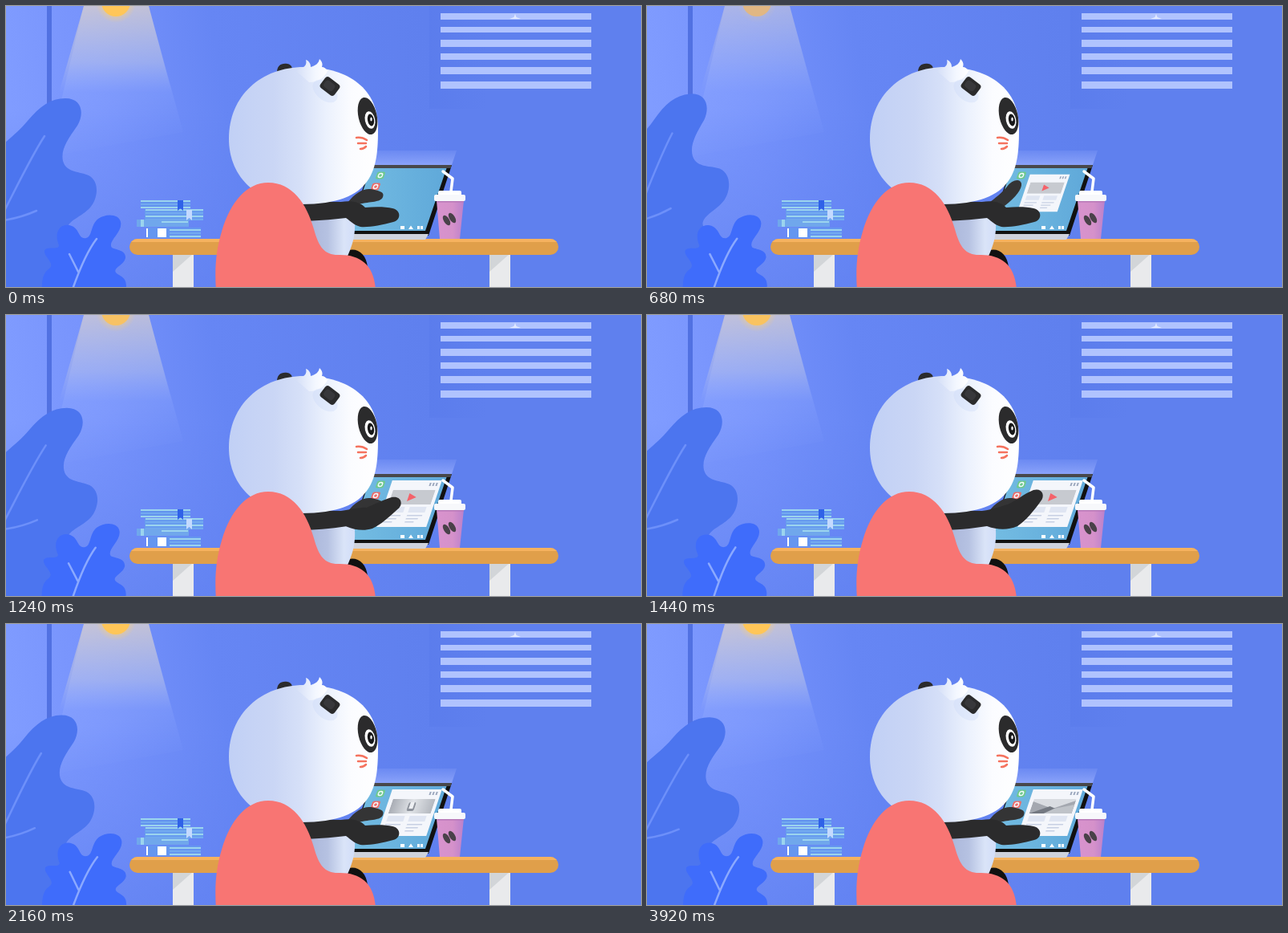
Recreate the animation shown at these times as an HTML page with a canvas. Size 792 px wide and 350 px high, loop 3.96 s.

```html
<!DOCTYPE html>
<html lang="en">
<head>
<meta charset="utf-8">
<title>Panda at the desk</title>
<style>
html, body { margin: 0; width: 100%; height: 100%; overflow: hidden; background: #5f80ee; }
canvas { display: block; }
</style>
</head>
<body>
<canvas id="stage" width="792" height="350"></canvas>
<script>
const ctx = document.getElementById('stage').getContext('2d');
const LOOP = 3960, STEP = 40;
const INK = '#2b2b2c';

// Eased value between [time, value] keys.
function track(t, keys) {
  for (let i = 1; i < keys.length; i++) {
    const [t0, a] = keys[i - 1], [t1, b] = keys[i];
    if (t <= t1) {
      const p = Math.max(0, (t - t0) / (t1 - t0));
      return a + (b - a) * p * p * (3 - 2 * p);
    }
  }
  return keys[keys.length - 1][1];
}

// Blends two paths that share the same commands.
function morph(from, to, p) {
  const number = /-?[\d.]+/g;
  const ends = to.match(number);
  let i = 0;
  return from.replace(number, n => +n + (ends[i++] - n) * p);
}

function linear(x0, y0, x1, y1, ...stops) {
  const g = ctx.createLinearGradient(x0, y0, x1, y1);
  stops.forEach(([p, c]) => g.addColorStop(p, c));
  return g;
}

function rect(x, y, w, h, color) {
  ctx.fillStyle = color;
  ctx.fillRect(x, y, w, h);
}

function shape(d, color) {
  ctx.fillStyle = color;
  ctx.fill(new Path2D(d));
}

function line(d, color, width) {
  ctx.strokeStyle = color;
  ctx.lineWidth = width;
  ctx.lineCap = ctx.lineJoin = 'round';
  ctx.stroke(new Path2D(d));
}

function oval(x, y, rx, ry, color, angle = 0) {
  ctx.fillStyle = color;
  ctx.beginPath();
  ctx.ellipse(x, y, rx, ry, angle, 0, Math.PI * 2);
  ctx.fill();
}

function rounded(x, y, w, h, r, color) {
  ctx.fillStyle = color;
  ctx.beginPath();
  ctx.roundRect(x, y, w, h, r);
  ctx.fill();
}

function group(draw) {
  ctx.save();
  draw();
  ctx.restore();
}

function rotateAbout(x, y, angle) {
  ctx.translate(x, y);
  ctx.rotate(angle);
  ctx.translate(-x, -y);
}

function room() {
  rect(0, 0, 792, 350, linear(0, 90, 520, 0,
    [0, '#809cff'], [0.22, '#7793fc'], [0.5, '#6686f4'], [1, '#5f80ee']));
  rect(0, 130, 330, 220, linear(0, 130, 0, 350,
    [0, 'rgba(95,128,240,0)'], [1, 'rgba(95,128,240,.7)']));
  rect(51, 0, 6, 140, '#5171e2');
  rect(528, 0, 202, 128, linear(528, 0, 600, 0,
    [0, 'rgba(82,116,232,.28)'], [1, 'rgba(82,116,232,0)']));
  const bars = [[9, 8], [26, 7], [42, 9], [59, 8], [76, 9], [94, 9]];
  for (const [y, h] of bars) rect(542, y, 188, h, '#b0c3fe');
  shape('M635 10 L636.5 14 L642 16 H628 L633.5 14 Z', '#e2eaff');
}

function lamp(t) {
  const glow = track(t, [[0, 1], [280, 0.75], [640, 0.3], [1000, 1], [1280, 0.8], [1680, 1]]);
  shape('M97 0 H178 L221 157 Q140 172 52 188 Z', linear(108, 0, 140, 174,
    [0, 'rgba(160,180,255,.45)'], [0.7, 'rgba(145,170,255,.28)'], [1, 'rgba(140,166,255,.05)']));
  shape('M97 0 H178 L207 108 H66 Z', linear(0, 0, 0, 108,
    [0, `rgba(245,222,185,${0.2 + 0.35 * glow})`],
    [0.65, `rgba(225,220,215,${0.04 + 0.25 * glow})`],
    [1, 'rgba(205,214,240,0)']));
  const halo = ctx.createRadialGradient(137, -4, 14, 137, -4, 25);
  halo.addColorStop(0, `rgba(255,206,112,${0.55 * glow})`);
  halo.addColorStop(1, 'rgba(255,206,112,0)');
  oval(137, -4, 25, 25, halo);
  const mix = (a, b) => Math.round(a + (b - a) * glow);
  oval(137, -5, 18, 18, `rgb(${mix(211, 255)},${mix(176, 198)},${mix(151, 88)})`);
}

function plants(t) {
  const big = track(t, [[0, 0], [640, -0.09], [1040, 0.018], [1440, 0], [1840, -0.04],
    [2160, -0.022], [2480, 0.01], [2800, 0.018]]);
  group(() => {
    rotateAbout(0, 350, big);
    shape('M-40 215 C-10 172 10 164 27 143 C42 125 56 115 74 115 C95 115 98 134 89 149 ' +
      'C77 166 68 179 71 193 C75 208 93 206 103 211 C118 219 114 241 105 251 ' +
      'C94 263 79 266 76 277 L85 390 L-40 390 Z', '#4c75ef');
    line('M48 162 C30 190 15 222 -6 263 M38 255 Q18 264 -4 267', '#6d90fa', 2.5);
  });
  const small = track(t, [[0, 0], [280, 0.015], [680, -0.01], [1040, 0], [1440, -0.035],
    [1800, -0.01], [2160, 0.012], [2480, 0.02], [2800, 0.012]]);
  group(() => {
    rotateAbout(95, 365, small);
    shape('M43 370 C47 352 41 336 54 327 C62 321 47 312 48 305 C50 298 66 305 66 298 ' +
      'C59 281 68 271 79 273 C93 276 89 291 100 289 C108 287 105 273 115 265 ' +
      'C125 258 141 259 143 269 C146 282 126 293 132 301 C138 304 150 304 149 314 ' +
      'C147 323 133 326 137 332 C142 337 150 337 150 349 L146 370 Z', '#3f6cfb');
    line('M113 290 C103 303 94 322 84 350 M79 309 L90 331', '#8ba9ff', 2.5);
  });
}

function books() {
  const cover = '#72aaf0', page = '#9bd4ee';
  const stripes = (x, y, w, rows) => {
    for (let i = 0; i < rows; i++) rect(x, y + i * 4, w, 2, i % 2 ? cover : page);
  };
  rect(168, 242, 62, 8, '#6293ee');
  stripes(168, 242, 62, 3);
  rect(173, 253, 73, 13, '#679cee');
  stripes(174, 253, 72, 4);
  rect(163, 266, 65, 9, '#70a7ec');
  rect(168, 266, 4, 9, page);
  rect(194, 268, 33, 2, page);
  rect(175, 276, 68, 13, '#6596f0');
  stripes(204, 278, 39, 3);
  rect(175, 277, 2, 11, '#fff');
  rect(189, 277, 11, 11, '#fff');
  shape('M214 242 h7 v13 l-3.5 -3 l-3.5 3 Z', '#2f62e8');
  shape('M225 254 h7 v13 l-3.5 -3 l-3.5 3 Z', '#c4daff');
}

function desk() {
  for (const x of [208, 603]) {
    rect(x, 308, 26, 42, '#e9eaec');
    shape(`M${x} 308 h26 L${x} 331 Z`, '#d2d5d8');
  }
  rounded(154, 290, 535, 20, 10, '#e09f4a');
  group(() => {
    ctx.beginPath();
    ctx.rect(154, 290, 535, 4);
    ctx.clip();
    rounded(154, 290, 535, 20, 10, '#f6b25e');
  });
}

function video(t) {
  group(() => {
    ctx.beginPath();
    ctx.rect(-26, -17, 53, 18);
    ctx.clip();
    if (t < 1680) {
      rect(-26, -17, 53, 18, '#c7cad0');
      shape('M-4 -13 L6 -8 L-4 -3 Z', '#f4626a');
    } else if (t < 2640) {
      const p = (t - 1680) / 960;
      rect(-26, -17, 53, 18, linear(-26, 0, 27, 0, [0, '#a9adb5'], [0.5, '#e1e4e8'], [1, '#b4b8bf']));
      rounded(-5 + p, -13, 9, 11, 2, '#8e939c');
      rect(-3 + p, -13, 5, 8, '#eef0f3');
    } else {
      const p = (t - 2640) / 1320;
      rect(-26, -17, 53, 18, '#d9dce1');
      shape(`M-26 -14 L${-2 + 3 * p} ${-6 + p} L27 -15 V1 H-26 Z`, '#a4a8b0');
      shape(`M-26 1 L${-7 + 4 * p} -8 L${2 + 3 * p} -5 L27 1 Z`, '#747982');
      shape('M-8 1 L3 -5 L27 -10 V1 Z', '#bfc3c9');
    }
  });
}

// The window grows out of the red icon.
function browser(t) {
  const p = Math.min(1, Math.max(0, (t - 480) / 360));
  if (!p) return;
  const size = 1 - (1 - p) ** 2;
  group(() => {
    ctx.transform(1, 0, -0.338, 1, 461 + 42 * size, 225 + 10 * size);
    ctx.scale(size, size);
    rect(-31, -29, 62, 58, '#f4f6fb');
    for (let i = 0; i < 3; i++) rect(17 + i * 4, -26, 2, 4, '#9ba7bd');
    video(t);
    for (const x of [-25, 2]) {
      rect(x, 4, 21, 7, '#dfe5f2');
      for (let i = 0; i < 3; i++) rect(x, 14 + i * 4, 19 - i * 4, 1.5, '#c7d0e3');
    }
  });
}

function icon(x, y, color) {
  group(() => {
    ctx.transform(1, 0, -0.338, 1, x, y);
    rounded(-5, -4.5, 10, 9, 2, color);
    ctx.strokeStyle = '#f2fbff';
    ctx.lineWidth = 1.4;
    ctx.beginPath();
    ctx.arc(0, 0, 2.5, 0, Math.PI * 2);
    ctx.stroke();
  });
}

function laptop(t) {
  shape('M440 180 H562 L556 198 H440 Z', linear(0, 178, 0, 198,
    [0, 'rgba(155,175,255,.12)'], [1, 'rgba(160,180,255,.65)']));
  shape('M455 198 H556 L527 286 H425 Z', '#111');
  shape('M455 198 H556 L554.5 202 H455 Z', '#48484b');
  shape('M455 202 H549.5 L523 280 H428 Z', linear(440, 0, 540, 0, [0, '#72bbe2'], [1, '#61aada']));
  icon(467, 211, '#6fc98c');
  icon(461, 225, '#ee6c69');
  browser(t);
  rect(492, 274, 5, 4, '#fff');
  shape('M502 278 L505 273.5 L508 278 Z', '#fff');
  rect(513, 274, 3, 4, '#fff');
  rect(517, 274, 3, 4, '#fff');
  shape('M425 284 H527 L523 291 H425 Z', '#ced2dc');
}

function cup() {
  line('M545 206 L557 215 L555 231', '#fff', 3.5);
  shape('M537 242 H571 L566 290 H541 Z', linear(538, 0, 570, 0,
    [0, '#d893cd'], [0.6, '#d591ca'], [1, '#bd82cb']));
  rounded(539, 230, 29, 7, 2, '#fff');
  rounded(534, 235, 39, 8, 2, '#f7f8fb');
  rect(537, 243, 34, 1.5, '#b878b7');
  oval(549.5, 267, 3.5, 7, '#494149', -0.55);
  oval(556.5, 264, 3.5, 7, '#494149', -0.55);
}

function farArm(t) {
  const lift = track(t, [[0, 0], [280, 0], [560, 1], [680, 1], [960, 0]]);
  shape(morph(
    'M425 246 C436 232 446 227 455 228 C464 230 473 231 470 238 C467 245 455 243 440 247 Z',
    'M425 246 C434 240 443 232 449 225 C455 217 465 214 467 221 C468 228 460 238 446 249 Z',
    lift), '#343435');
}

function nearArm(t) {
  const lift = track(t, [[0, 0], [920, 0], [1400, 1], [1480, 1], [1840, 0]]);
  shape(morph(
    'M360 243 L418 244 C430 242 442 244 448 251 C460 250 474 250 482 252 C493 254 493 267 483 269 ' +
    'C468 273 452 276 442 275 C434 273 430 268 424 264 C405 266 385 268 360 268 Z',
    'M360 243 L418 244 C432 242 442 238 450 236 C462 230 470 223 482 218 C493 215 497 225 491 232 ' +
    'C484 242 472 257 462 263 C450 268 438 268 424 263 C405 266 385 268 360 268 Z',
    lift), INK);
}

function head() {
  shape('M338 86 C337 73 344 71 351 72 C357 73 357 78 358 83 Z', INK);
  shape('M278 165 C278 112 318 76 372 76 C420 76 464 98 464 152 ' +
    'C464 202 460 247 368 247 C315 247 278 215 278 165 Z',
    linear(278, 0, 464, 0, [0, '#c1d0f5'], [0.3, '#cad6f5'], [0.48, '#d6e0f8'],
      [0.65, '#ebf1fd'], [0.82, '#fbfcff'], [1, '#fff']));
  shape('M362 81 C371 76 376 75 374 67 C379 69 380 73 380 76 C387 74 390 71 391 66 ' +
    'C395 70 395 73 394 76 Q398 76 401 81 Q394 95 378 95 Z',
    linear(362, 0, 401, 0, [0, '#d5dff7'], [0.6, '#f3f7ff'], [1, '#fff']));
  oval(398, 106, 18, 11, 'rgba(200,216,247,.35)', 0.7);
  group(() => {
    rotateAbout(404, 100, 0.65);
    rounded(393, 91.5, 22, 17, 4, INK);
    rounded(396, 95, 14, 10, 4, '#38383b');
  });

  oval(451, 137, 11.5, 23.5, INK, -0.22);
  oval(454, 142, 6.2, 11, '#fff', -0.2);
  oval(455, 142, 4, 7.5, '#171718', -0.18);
  oval(455.5, 141, 1.2, 2.5, '#fff');
  line('M437 164 Q444 163 450 167 M439 171 Q445 171 449 171 M442 178 Q446 178 449 175', '#f5735f', 2.5);
}

function panda(t) {
  farArm(t);
  shape('M422 306 C436 299 449 307 451 325 L425 335 Z', '#111');
  shape('M365 258 H434 C438 285 431 300 425 314 H370 Z', linear(378, 0, 436, 0,
    [0, '#aab6da'], [0.4, '#b6c2e2'], [0.75, '#dae4f8'], [1, '#d1ddf9']));
  nearArm(t);
  head();
}

function chair() {
  shape('M262 355 C260 326 262 304 269 281 C280 243 301 220 327 220 ' +
    'C357 220 375 246 384 278 C390 300 397 310 414 310 C442 309 460 323 461 355 Z', '#f87573');
}

function render(t) {
  room();
  lamp(t);
  plants(t);
  books();
  desk();
  laptop(t);
  cup();
  panda(t);
  chair();
}

const start = performance.now();
function tick() {
  const elapsed = (performance.now() - start) % LOOP;
  render(Math.floor(elapsed / STEP) * STEP);
  requestAnimationFrame(tick);
}
tick();
</script>
</body>
</html>
```
